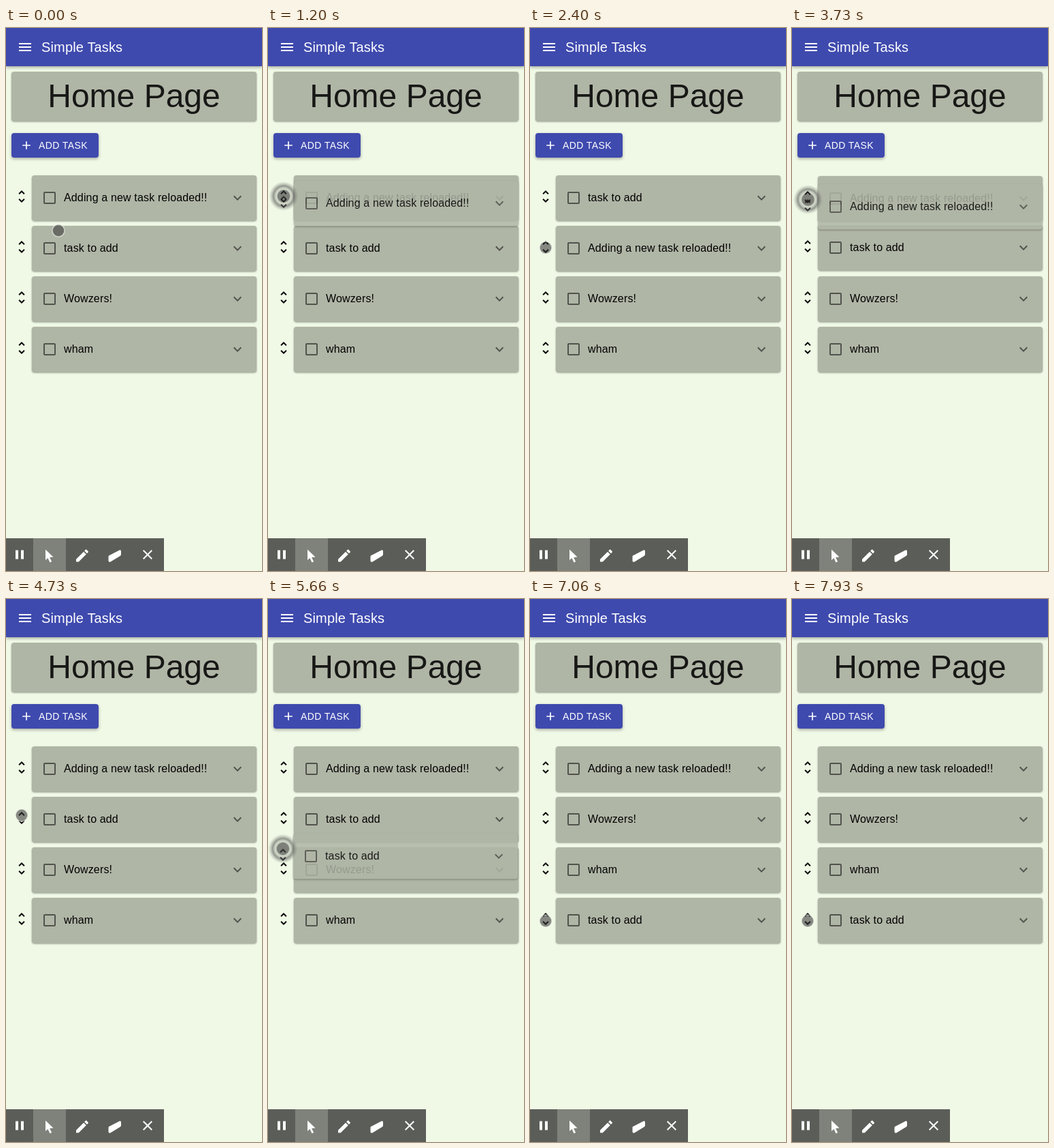
Write an HTML page that moves like this. It is 376 px wide and 796 px high and loops after 8 s.

```html
<!DOCTYPE html>
<html lang="en">
<head>
<meta charset="utf-8">
<title>Simple Tasks</title>
<style>
  html, body { margin: 0; width: 100%; height: 100%; overflow: hidden; background: #f0f9e6; }
  svg { display: block; font: 16px "Liberation Sans", Arial, sans-serif; }
  .card { fill: #b0b6a6; filter: drop-shadow(0 1px 1px rgba(0,0,0,.38)); }
  .bar { fill: #3f4aae; filter: drop-shadow(0 2px 2px rgba(0,0,0,.3)); }
  .label { letter-spacing: .15px; }
  .soft { fill-opacity: .54; }
  .white { fill: #fff; }
</style>
</head>
<body>
<svg width="376" height="796" viewBox="0 0 376 796">
  <defs>
    <radialGradient id="glow">
      <stop offset="0" stop-color="#323232" stop-opacity=".62"/>
      <stop offset=".4" stop-color="#323232" stop-opacity=".6"/>
      <stop offset=".47" stop-color="#555" stop-opacity=".2"/>
      <stop offset=".55" stop-color="#555" stop-opacity=".25"/>
      <stop offset=".7" stop-color="#444" stop-opacity=".55"/>
      <stop offset=".82" stop-color="#555" stop-opacity=".3"/>
      <stop offset="1" stop-color="#666" stop-opacity="0"/>
    </radialGradient>
    <g id="row">
      <path transform="translate(11 19)" d="M12 5.83L15.17 9l1.41-1.41L12 3 7.41 7.59 8.83 9zm0 12.34L8.83 15l-1.41 1.41L12 21l4.59-4.59L15.17 15z"/>
      <rect class="card" x="38" width="330" height="66.5" rx="4"/>
      <path class="soft" transform="translate(52 21)" d="M19 5v14H5V5h14m0-2H5c-1.1 0-2 .9-2 2v14c0 1.1.9 2 2 2h14c1.1 0 2-.9 2-2V5c0-1.1-.9-2-2-2z"/>
      <path class="soft" transform="translate(328 21)" d="M16.59 8.59L12 13.17 7.41 8.59 6 10l6 6 6-6z"/>
    </g>
  </defs>

  <rect class="bar" width="376" height="56"/>
  <g class="white">
    <path transform="translate(16 16)" d="M3 18h18v-2H3zm0-5h18v-2H3zm0-7v2h18V6z"/>
    <text class="label" x="52" y="35" font-size="20">Simple Tasks</text>
  </g>

  <rect class="card" x="8" y="64" width="360" height="72.5" rx="4"/>
  <text x="188" y="116" font-size="48" text-anchor="middle" fill-opacity=".87">Home Page</text>

  <rect class="bar" x="8" y="154" width="128" height="36" rx="4"/>
  <g class="white">
    <path transform="translate(20 162) scale(.8333)" d="M19 13h-6v6h-2v-6H5v-2h6V5h2v6h6z"/>
    <text x="48" y="177" font-size="14" letter-spacing=".4">ADD TASK</text>
  </g>

  <g id="list"></g>
  <g id="copy" opacity=".85"><use href="#row"/><text class="label" x="85" y="38"></text></g>

  <rect y="748" width="232" height="48" fill="#5b5e58"/>
  <rect x="40" y="748" width="48" height="48" fill="#7f827b"/>
  <g class="white">
    <path transform="translate(8 760)" d="M6 18.5h4v-13H6zm8-13v13h4v-13z"/>
    <path d="M58 764.5V780l3.5-3 3 6.500 2.600-1.200-3-6.300 5.400-.5z"/>
    <path transform="translate(100 761.500)" d="M3 17.25V21h3.75L17.81 9.94l-3.75-3.75zM20.710 7.04c.39-.39.39-1.02 0-1.410l-2.340-2.340c-.39-.39-1.020-.39-1.410 0l-1.830 1.830 3.750 3.750z"/>
    <path d="M151 773.500L166.500 765.500Q169 764.500 169 767V771.500Q169 773 167.500 774L153.500 782.500Q150.500 783.500 150.500 781V775Q150.500 774 151 773.500z"/>
    <path transform="translate(196 760)" d="M19 6.410L17.590 5 12 10.590 6.410 5 5 6.410 10.590 12 5 17.590 6.410 19 12 13.410 17.590 19 19 17.590 13.410 12z"/>
  </g>

  <g id="pointer">
    <circle id="dot" r="9" fill="#323232" fill-opacity=".56" stroke="#f4f8ee" stroke-opacity=".6" stroke-width="1.6"/>
    <circle id="ring" r="21.500" fill="url(#glow)"/>
  </g>
</svg>
<script>
const LOOP = 8000, FLIP = 370, TOP = 216, PITCH = 74;
const tasks = ["Adding a new task reloaded!!", "task to add", "Wowzers!", "wham"];

// Order changes: start time, then the slot of each task
const orders = [
  [-FLIP, [0, 1, 2, 3]],
  [1560, [1, 0, 2, 3]],
  [3450, [0, 1, 2, 3]],
  [6470, [0, 3, 1, 2]],
];
// Pointer path: time, x, y
const path = [
  [60, 77, 297], [600, 23, 246.5], [1200, 23, 246.5], [1930, 23, 322],
  [3330, 23, 322], [3660, 23.5, 251.5], [4130, 23.5, 251.5], [4730, 23, 317],
  [5330, 23, 317], [6130, 20, 449], [6460, 20, 451.5], [6730, 23, 472],
];
const drags = [
  { press: 800, lift: 1200, drop: 2260, task: 0, slot: 0 },
  { press: 3060, lift: 3330, drop: 4130, task: 0, slot: 1 },
  { press: 5330, lift: 5400, drop: 7060, task: 1, slot: 1 },
];

const $ = id => document.getElementById(id);
const mix = (a, b, p) => a + (b - a) * p;
const move = (el, x, y) => el.setAttribute("transform", `translate(${x} ${y})`);
const show = (el, on) => el.setAttribute("visibility", on ? "visible" : "hidden");

const copy = $("copy"), copyText = copy.querySelector("text");
const rows = tasks.map(name => {
  const row = copy.cloneNode(true);
  row.removeAttribute("id");
  row.removeAttribute("opacity");
  row.querySelector("text").textContent = name;
  return $("list").appendChild(row);
});

function pointerAt(t) {
  const i = path.findIndex(k => k[0] > t);
  if (i < 0) return path.at(-1).slice(1);
  if (!i) return path[0].slice(1);
  const [a, b] = [path[i - 1], path[i]];
  const p = (t - a[0]) / (b[0] - a[0]), s = p * p * (3 - 2 * p);
  return [mix(a[1], b[1], s), mix(a[2], b[2], s)];
}

function draw(t) {
  const n = orders.findLastIndex(o => o[0] <= t);
  const [start, slots] = orders[n];
  const before = orders[Math.max(0, n - 1)][1];
  const p = 1 - (1 - Math.min(1, (t - start) / FLIP)) ** 3;
  rows.forEach((row, i) => move(row, 0, TOP + PITCH * mix(before[i], slots[i], p)));

  const [x, y] = pointerAt(t);
  const drag = drags.find(d => t >= d.press && t < d.drop);
  move($("pointer"), x, y);
  show($("dot"), !drag);
  show($("ring"), drag);

  const lifted = drag && t >= drag.lift;
  show(copy, lifted);
  if (lifted) {
    copyText.textContent = tasks[drag.task];
    move(copy, Math.round(x - 23.1), Math.round(y - 22.5));
  }
}

const origin = performance.now();
function tick() {
  draw((performance.now() - origin) % LOOP);
  requestAnimationFrame(tick);
}
tick();
</script>
</body>
</html>
```
